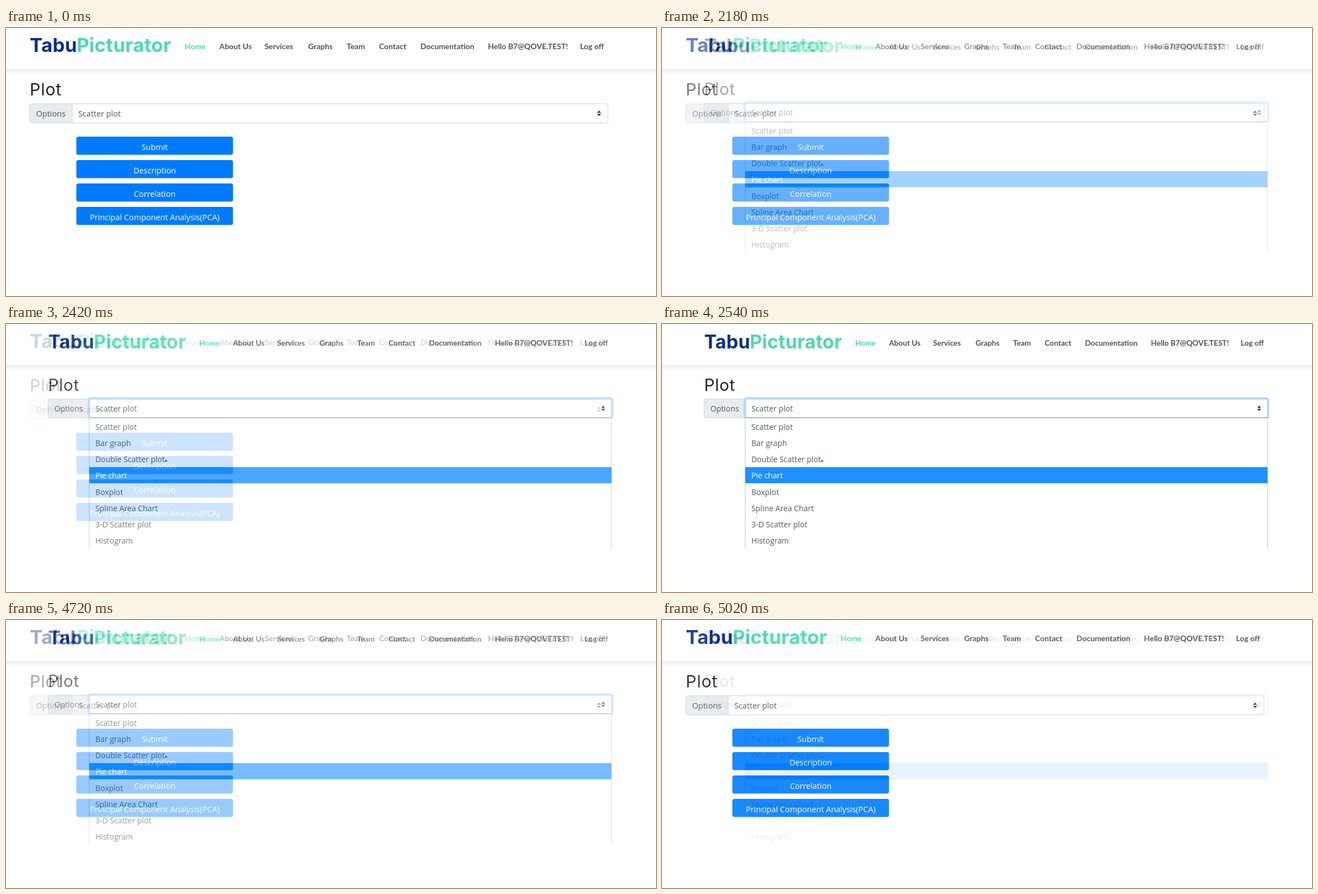
An HTML page that plays this animation: 1164 px wide and 481 px high, repeating every 5.08 s.

```html
<!DOCTYPE html>
<html lang="en">
<head>
<meta charset="utf-8">
<title>Plot options</title>
<style>
  html, body { margin: 0; width: 100%; height: 100%; overflow: hidden; background: #fff; }
  svg { display: block; }
  text { font: 14.25px "Open Sans", "Noto Sans", sans-serif; fill: #54595e; }
  .nav { font: 700 13.9px Lato, sans-serif; fill: #535353; }
  .nav.active { fill: #50d8af; }
  .logo { font: 700 34.5px Inter, sans-serif; letter-spacing: .2px; fill: #0c2e8a; }
  .logo.accent { fill: #50d8af; }
  .title { font: 400 30px Inter, sans-serif; letter-spacing: .8px; fill: #212529; }
  .light { fill: #fff; }
  .button { text-anchor: middle; }
</style>
</head>
<body>
<svg width="1164" height="481" viewBox="0 0 1164 481">
  <defs>
    <linearGradient id="shade" x2="0" y2="1">
      <stop stop-color="#ebebec"/>
      <stop offset=".4" stop-color="#f7f7f8"/>
      <stop offset="1" stop-color="#fff"/>
    </linearGradient>
  </defs>
  <g id="closed"></g>
  <g id="open"></g>
</svg>
<script>
const FADE_STEP = 60, HOLD = 2000, HALF = 2540;
const closed = document.getElementById('closed');
const open = document.getElementById('open');

const text = (x, y, label, cls = '') => `<text x="${x}" y="${y}" class="${cls}">${label}</text>`;
const rect = (x, y, w, h, fill, extra = '') =>
  `<rect x="${x}" y="${y}" width="${w}" height="${h}" fill="${fill}" ${extra}/>`;

const backdrop = rect(0, 0, 1164, 481, '#fff') + rect(0, 73.5, 1164, 13, 'url(#shade)');

const links = [
  [320, 'Home'], [382, 'About Us'], [463, 'Services'], [541, 'Graphs'], [610, 'Team'],
  [668, 'Contact'], [742, 'Documentation'], [863, 'Hello B7@QOVE.TEST!'], [1028, 'Log off']
];

// Header, title and select box, shared by both states
const page =
  text(42.5, 43, 'Tabu', 'logo') + text(126.5, 43, 'Picturator', 'logo accent') +
  links.map(([x, label], i) => text(x, 38, label, i ? 'nav' : 'nav active')).join('') +
  text(42.5, 121, 'Plot', 'title') +
  rect(42.5, 136, 1035.5, 34.5, '#fff', 'rx="4"') +
  '<path d="M118.5 136H46.5a4 4 0 0 0-4 4v26.5a4 4 0 0 0 4 4h72z" fill="#e9ecef"/>' +
  rect(42.5, 136, 1035.5, 34.5, 'none', 'rx="4" stroke="#ced4da"') +
  '<path d="M118.5 136v34.5" stroke="#ced4da"/>' +
  text(54, 159, 'Options') + text(129.5, 159, 'Scatter plot') +
  '<path d="M1062 148.3l-3.9 4h7.8zm0 9.8l-3.9-4h7.8z" fill="#343a40"/>';

const buttons = ['Submit', 'Description', 'Correlation', 'Principal Component Analysis(PCA)']
  .map((label, i) =>
    rect(126, 195 + 42 * i, 280.5, 32.5, '#007bff', 'rx="3.5"') +
    text(266.3, 218.7 + 42 * i, label, 'light button'));

const choices = ['Scatter plot', 'Bar graph', 'Double Scatter plot', 'Pie chart', 'Boxplot',
  'Spline Area Chart', '3-D Scatter plot', 'Histogram'];
const items = choices.map((label, i) =>
  `<g transform="translate(160 ${190 + 29.15 * i}) scale(.975)">` +
  text(0, 0, label, label === 'Pie chart' ? 'light' : '') + '</g>');

const focus =
  rect(147, 132.8, 939, 36.6, 'none', 'rx="4" stroke="#bfdeff" stroke-width="3"') +
  rect(148.7, 134.5, 935.8, 33.4, 'none', 'rx="1" stroke="#80bdff"');

const menu =
  rect(149, 168, 935.5, 235, '#fff') +
  '<path d="M149 403V168.3H1084.3V403" fill="none" stroke="#a9c8ee"/>' +
  '<path d="M149 168.3H1084.3" stroke="#6facee"/>' +
  rect(149, 256.8, 935.3, 29, '#1e90ff') +
  items.join('') +
  rect(285, 244, 3.4, 3.4, '#dc3038', 'rx="1"');

closed.innerHTML = backdrop + page + buttons.join('');
open.innerHTML = backdrop + `<g transform="translate(34 2) scale(.975)">${page}</g>` + focus + menu;

// Each half holds, then crossfades in nine steps of a tenth
function openness(time) {
  const local = time % HALF;
  const mix = local < HOLD ? 0 : (Math.floor((local - HOLD) / FADE_STEP) + 1) / 10;
  return time < HALF ? mix : 1 - mix;
}

function draw() {
  open.setAttribute('opacity', openness(performance.now() % (2 * HALF)));
  requestAnimationFrame(draw);
}
draw();
</script>
</body>
</html>
```
